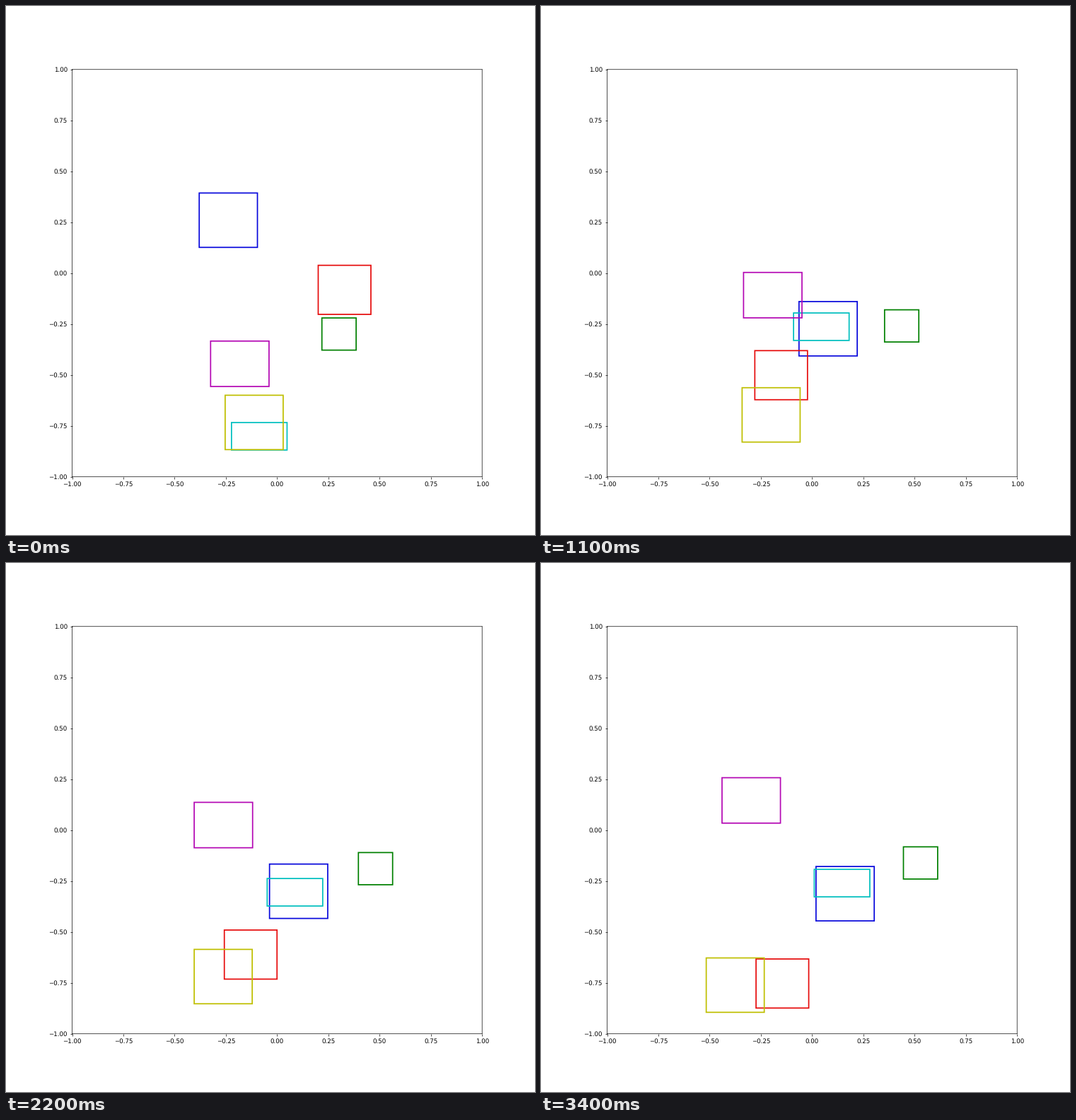
Animation of 748 by 748 pixels, one loop 3500 ms. Source, as a matplotlib script:

```python
import numpy as np
import matplotlib.pyplot as plt
from matplotlib.animation import FuncAnimation
from matplotlib.patches import Rectangle

FRAMES = 35
INTERVAL = 100
KEYS = np.array([0, 5, 11, 22, 34])


def glide(points):
    """Ease through the key points without overshoot, one row per frame."""
    p = np.array(points)
    h = np.diff(KEYS)[:, None]
    s = np.diff(p, axis=0) / h
    a, b = s[:-1], s[1:]
    same = a * b > 0
    inner = np.where(same, 2 * a * b / np.where(same, a + b, 1), 0)
    d = np.vstack([1.5 * s[0] - 0.5 * inner[0], inner,
                   1.5 * s[-1] - 0.5 * inner[-1]])

    t = np.arange(FRAMES)
    k = np.clip(np.searchsorted(KEYS, t, side="right") - 1, 0, len(h) - 1)
    u = (t - KEYS[k])[:, None] / h[k]
    ease = u * u * (3 - 2 * u)
    return (p[k] + ease * (p[k + 1] - p[k])
            + h[k] * u * (1 - u) * ((1 - u) * d[k] - u * d[k + 1]))


plt.rcParams["text.hinting"] = "none"
fig, ax = plt.subplots(figsize=(12, 12), dpi=748 / 12)
ax.set_xlim(-1, 1)
ax.set_ylim(-1, 1)
ax.tick_params(axis="y", pad=4)
for spine in ax.spines.values():
    spine.set_snap(False)

movers = []


def add_box(color, width, height, *centers):
    box = Rectangle((0, 0), width, height, fill=False, edgecolor=color,
                    linewidth=2, snap=False)
    ax.add_patch(box)
    movers.append((box, glide(centers) - [width / 2, height / 2]))


# A quick rush to the first stops, then a slow drift
add_box("#0808dc", 0.284, 0.267, (-0.238, 0.260), (0.072, -0.079),
        (0.078, -0.273), (0.105, -0.300), (0.161, -0.312))
add_box("g", 0.167, 0.158, (0.302, -0.299), (0.320, -0.247),
        (0.437, -0.259), (0.480, -0.189), (0.529, -0.161))
add_box("#e60c0c", 0.257, 0.241, (0.329, -0.082), (-0.043, -0.439),
        (-0.151, -0.501), (-0.129, -0.611), (-0.145, -0.753))
add_box("c", 0.271, 0.135, (-0.087, -0.801), (-0.074, -0.470),
        (0.045, -0.263), (0.087, -0.305), (0.146, -0.260))
add_box("#b408b4", 0.285, 0.223, (-0.182, -0.445), (-0.153, -0.147),
        (-0.192, -0.108), (-0.262, 0.025), (-0.297, 0.146))
add_box("y", 0.283, 0.267, (-0.112, -0.733), (-0.106, -0.717),
        (-0.200, -0.696), (-0.263, -0.719), (-0.375, -0.761))


def update(frame):
    for box, corners in movers:
        box.set_xy(corners[frame])
    return [box for box, _ in movers]


anim = FuncAnimation(fig, update, frames=FRAMES, interval=INTERVAL,
                     repeat=True, repeat_delay=0)
plt.show()
```
